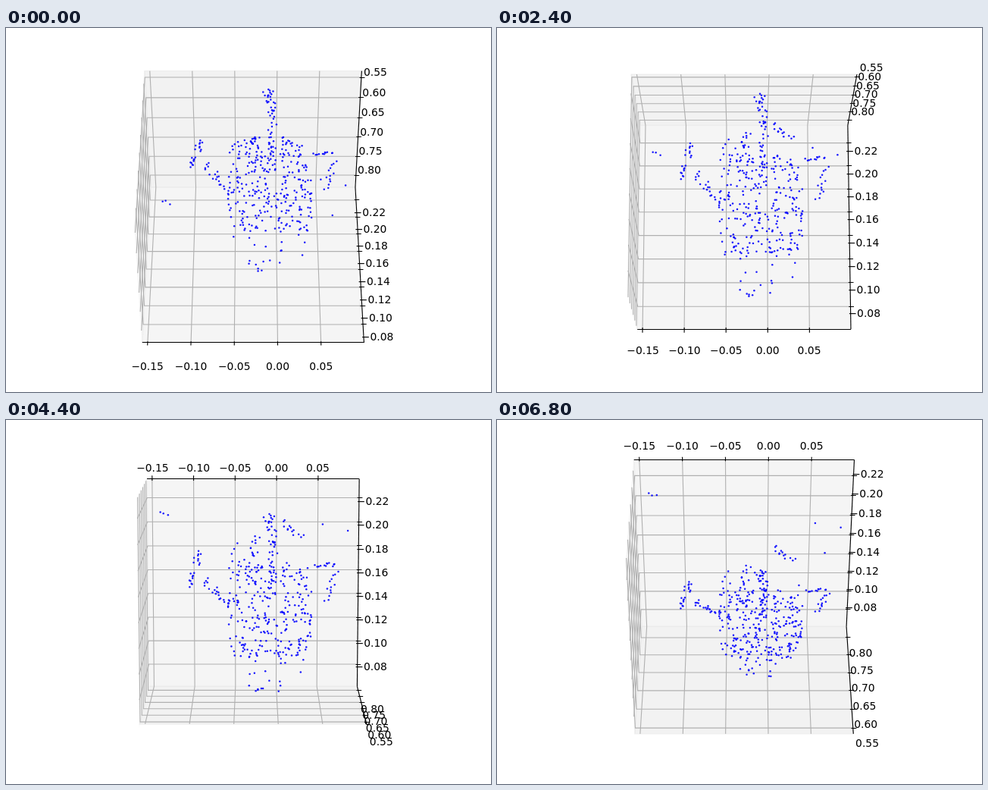
Write an HTML page with a canvas that moves like this. It is 640 px wide and 480 px high and loops after 7200 ms.

```html
<!DOCTYPE html>
<html lang="en">
<head>
<meta charset="utf-8">
<title>Rotating point cloud</title>
<style>
html, body { margin: 0; width: 100%; height: 100%; overflow: hidden; background: #fff; }
canvas { display: block; width: 640px; height: 480px; }
</style>
</head>
<body>
<canvas id="stage" width="640" height="480"></canvas>
<script>
const ctx = document.getElementById('stage').getContext('2d');

// Camera: pinhole at distance DIST from the centre of the box
const CX = 326.1, CY = 233.9, FOCAL = 2432.4, DIST = 10;
const STEP_MS = 400, STEPS = 18;
const START_DEG = 45, STEP_DEG = 5;

// Half sizes of the box; z is the depth axis
const A = 0.5952, B = 0.4464;
const DELTA = 0.0952, DELTA_Z = 0.0714;
const PAD = 0.852;

const axis = (half, mid, range, first, step, count) =>
  Array.from({ length: count }, (_, i) => {
    const value = first + i * step;
    return {
      at: (value - mid) / range * half,
      text: value.toFixed(2).replace('-', '\u2212')
    };
  });
const xTicks = axis(A, -0.0283, 0.1279, -0.15, 0.05, 5);
xTicks[3].text = '0.00';
const yTicks = axis(A, -0.14827, 0.08726, -0.22, 0.02, 8);
const zTicks = axis(B, 0.68378, 0.14918, 0.55, 0.05, 6);

let sin = 0, cos = 1;

function tilt(deg) {
  sin = Math.sin(deg * Math.PI / 180);
  cos = Math.cos(deg * Math.PI / 180);
}

function project(x, y, z) {
  const k = FOCAL / (DIST + z * cos - y * sin);
  return [CX + x * k, CY + (y * cos + z * sin) * k];
}

// Box position of a screen point whose depth z is known, for the current tilt
function unproject(px, py, z) {
  const p = (py - CY) / FOCAL;
  const y = (p * (DIST + z * cos) - z * sin) / (cos + p * sin);
  return [(px - CX) / FOCAL * (DIST + z * cos - y * sin), y, z];
}

function random(seed) {
  return () => {
    seed = seed + 0x6D2B79F5 | 0;
    let t = Math.imul(seed ^ seed >>> 15, 1 | seed);
    t = t + Math.imul(t ^ t >>> 7, 61 | t) ^ t;
    return ((t ^ t >>> 14) >>> 0) / 4294967296;
  };
}

const mix = (a, b, t) => a + (b - a) * t;

// Piecewise linear lookup in rows of [key, value, value, ...]
function lookup(rows, key, col) {
  let i = 0;
  while (i < rows.length - 2 && key > rows[i + 1][0]) i++;
  const [p, q] = [rows[i], rows[i + 1]];
  return mix(p[col], q[col], (key - p[0]) / (q[0] - p[0]));
}

// Loose points: screen x, screen y, depth
const strays = [
  [205, 145, .385], [209, 146, .372], [215, 149, .39], [417, 148, .17],
  [450, 157, .18], [431, 206, .215]
];

// Scattered strokes: count, spread, then x, y, depth at both ends
const strokes = [
  [16, 9, 347, 98, -.39, 349, 121, -.37],
  [4, 2, 352, 136, -.37, 354, 137, -.37],
  [28, 6, 352, 124, -.37, 352, 215, -.24],
  [10, 5, 254, 158, -.215, 251, 178, -.205],
  [10, 3, 247, 188, -.2, 243, 206, -.2],
  [20, 8, 263, 198, -.19, 292, 238, -.12],
  [11, 4, 411, 180, -.19, 431, 177, -.19],
  [13, 4, 436, 188, -.17, 421, 231, -.12],
  [13, 6, 368, 128, -.1, 388, 147, -.11],
  [10, 5, 331, 142, -.17, 324, 165, -.21],
  [5, 3, 304, 150, -.17, 297, 180, -.21]
];

// Body outline by row: y, left, right, depth
const body = [
  [160, 312, 358, -.25], [185, 298, 398, -.24], [250, 290, 408, -.2],
  [290, 297, 402, -.17], [345, 312, 386, -.09], [360, 328, 362, -.07]
];

function buildCloud() {
  const rnd = random(11);
  const cloud = [];
  const add = (x, y, z) => cloud.push(unproject(x, y, z));
  const jitter = size => size * (2 * rnd() - 1);
  tilt(5);

  strays.forEach(p => add(...p));

  for (const [count, spread, x0, y0, z0, x1, y1, z1] of strokes) {
    for (let i = 0; i < count; i++) {
      const t = i / (count - 1);
      add(mix(x0, x1, t) + jitter(spread), mix(y0, y1, t) + jitter(spread / 2), mix(z0, z1, t));
    }
  }

  for (let i = 0; i < 285; i++) {
    const y = rnd() < .72 ? mix(175, 305, rnd()) : mix(160, 360, rnd());
    const side = jitter(1);
    const left = lookup(body, y, 1), right = lookup(body, y, 2);
    const z = lookup(body, y, 3) + .08 * side * side + jitter(.065);
    add(mix(left, right, (side + 1) / 2), y, z);
  }
  return cloud;
}

function path(points) {
  ctx.beginPath();
  points.forEach(p => ctx.lineTo(...project(...p)));
}

function pane(shade, corners) {
  path(corners);
  ctx.closePath();
  ctx.fillStyle = ctx.strokeStyle = `rgba(${shade},${shade},${shade},.5)`;
  ctx.lineWidth = 1.39;
  ctx.fill();
  ctx.stroke();
}

function line(color, points) {
  path(points);
  ctx.strokeStyle = color;
  ctx.lineWidth = 1.11;
  ctx.stroke();
}

// Axis lines and ticks; level ones sit on whole pixels
function ink(p, q) {
  let [x0, y0] = project(...p), [x1, y1] = project(...q);
  const level = Math.abs(y0 - y1) < 1e-4;
  if (level) y0 = y1 = Math.floor(y0) + .5;
  ctx.beginPath();
  ctx.moveTo(x0, y0);
  ctx.lineTo(x1, y1);
  ctx.strokeStyle = '#000';
  ctx.lineWidth = level ? 1 : 1.11;
  ctx.stroke();
}

function label(text, x, y, z) {
  const [px, py] = project(x, y, z);
  ctx.fillText(text, px, Math.round(py + 11));
}

function drawBox(back) {
  const front = -back;
  const yb = back * A, yf = front * A;

  pane(242, [[-A, -A, -B], [-A, A, -B], [-A, A, B], [-A, -A, B]]);
  pane(230, [[-A, yb, -B], [A, yb, -B], [A, yb, B], [-A, yb, B]]);
  pane(236, [[-A, -A, B], [A, -A, B], [A, A, B], [-A, A, B]]);

  const grid = '#b0b0b0';
  xTicks.forEach(({ at }) => line(grid, [[at, yf, B], [at, yb, B], [at, yb, -B]]));
  yTicks.forEach(({ at }) => line(grid, [[A, at, B], [-A, at, B], [-A, at, -B]]));
  zTicks.forEach(({ at }) => line(grid, [[A, yb, at], [-A, yb, at], [-A, yf, at]]));

  ink([-A, yf, B], [A, yf, B]);
  ink([A, -A, B], [A, A, B]);
  ink([A, yb, -B], [A, yb, B]);

  const inner = A - .1 * DELTA, outer = A + .2 * DELTA;
  const far = A + PAD * DELTA, deep = B + PAD * DELTA_Z;
  ctx.fillStyle = '#000';
  for (const { at, text } of xTicks) {
    ink([at, front * inner, B], [at, front * outer, B]);
    label(text, at, front * far, deep);
  }
  for (const { at, text } of yTicks) {
    ink([inner, at, B], [outer, at, B]);
    label(text, far, at, deep);
  }
  for (const { at, text } of zTicks) {
    ink([inner, yb, at], [outer, yb, at]);
    label(text, far, back * far, at);
  }
}

const cloud = buildCloud();

function draw(step) {
  const deg = START_DEG - STEP_DEG * step;
  tilt(deg);
  ctx.fillStyle = '#fff';
  ctx.fillRect(0, 0, 640, 480);
  ctx.font = '13.89px "DejaVu Sans", sans-serif';
  ctx.textAlign = 'center';
  ctx.textBaseline = 'alphabetic';
  drawBox(deg >= 0 ? -1 : 1);

  ctx.fillStyle = 'rgba(0,0,255,.9)';
  for (const p of cloud) {
    const [x, y] = project(...p);
    ctx.beginPath();
    ctx.arc(x, y, 1.25, 0, 2 * Math.PI);
    ctx.fill();
  }
}

function tick() {
  draw(Math.floor(performance.now() / STEP_MS) % STEPS);
  requestAnimationFrame(tick);
}
tick();
</script>
</body>
</html>
```
